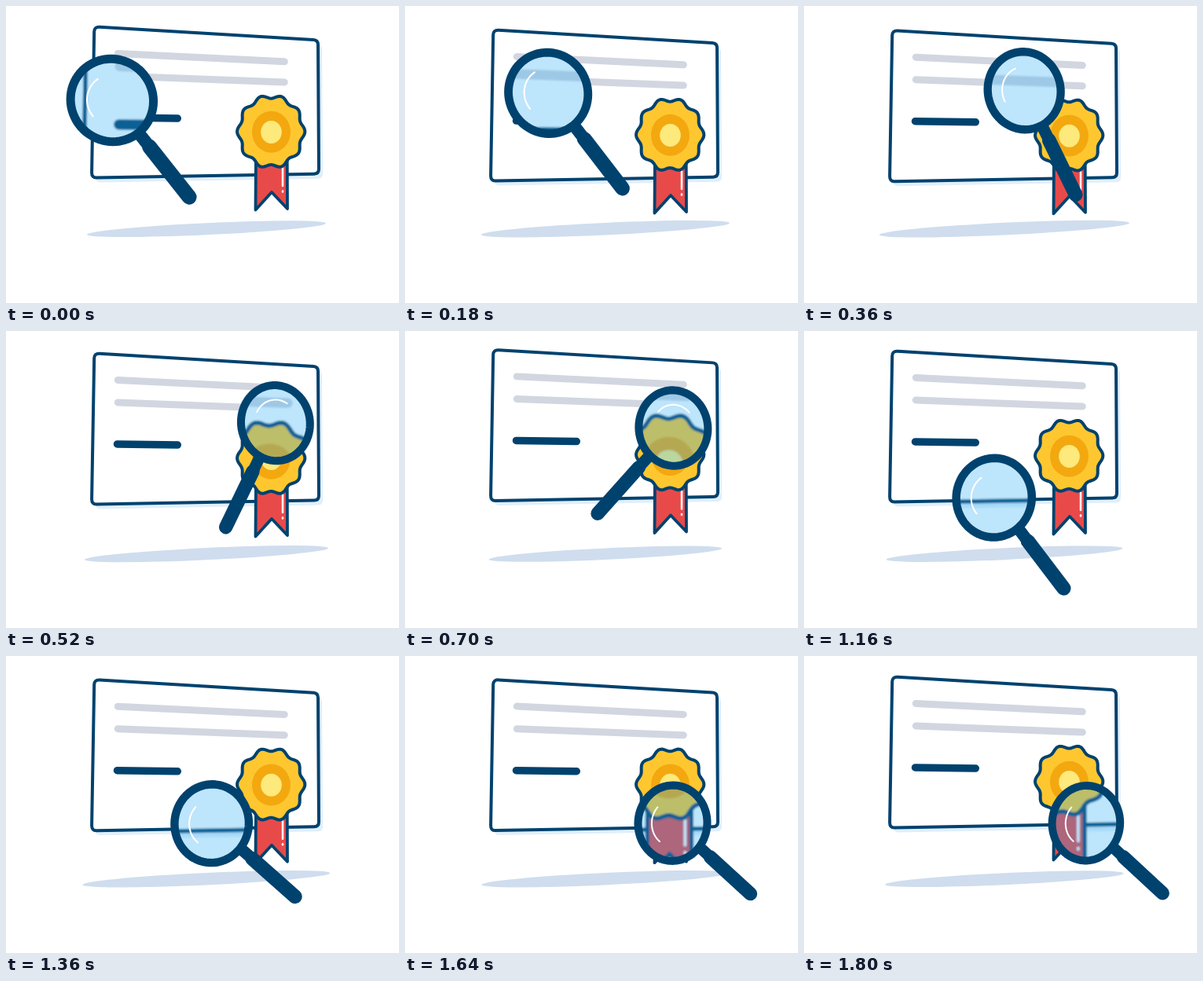
Write an HTML page that moves like this. It is 500 px wide and 378 px high and loops after 1.82 s.

```html
<!DOCTYPE html>
<html lang="en">
<head>
<meta charset="utf-8">
<title>Certificate check</title>
<style>
  html, body { margin: 0; width: 100%; height: 100%; overflow: hidden; background: #fff; }
  svg { display: block; width: 500px; height: 378px; }
  .ink { stroke: #00426e; stroke-linecap: round; stroke-linejoin: round; }
</style>
</head>
<body>
<svg viewBox="0 0 500 378">
  <defs>
    <clipPath id="glass"><path id="glassShape"/></clipPath>
    <filter id="soft" filterUnits="userSpaceOnUse" x="-20" y="-20" width="540" height="418">
      <feGaussianBlur stdDeviation="0.9"/>
    </filter>
    <path id="sheet" d="M119 26.7 L391 42.9 Q397 43.3 397 49 L398 207.5 Q398 213.5 392 213.6 L115 218.4 Q109 218.5 109.1 212 L112.2 32.5 Q112.5 26.3 119 26.7Z"/>
  </defs>

  <ellipse id="shadow" rx="152" ry="7.5" fill="#cfddee"/>

  <g id="card">
    <use href="#sheet" x="5" y="6" fill="#e0effb"/>
    <use href="#sheet" class="ink" fill="#fff" stroke-width="4"/>
    <g fill="none" stroke="#d2d6e0" stroke-width="9" stroke-linecap="round">
      <path d="M142.3 60.4 L354.3 70.8"/>
      <path d="M142.3 89 L354.3 97"/>
    </g>
    <path class="ink" stroke-width="9.5" d="M141.5 142 L218.3 143"/>
    <path class="ink" fill="#e84a4a" stroke-width="3.8" d="M318 190 L317.5 259.5 L338 237 L358 258 L357.7 190Z"/>
    <path fill="none" stroke="#fff" stroke-width="2.5" stroke-linecap="round" d="M352 206 V229 M352 235.5 V236.5"/>
    <path id="seal" class="ink" fill="#ffc72f" stroke-width="4"/>
    <ellipse cx="337.5" cy="160.3" rx="24.5" ry="26.5" fill="#f3a810"/>
    <ellipse cx="337.5" cy="160.5" rx="13.3" ry="14.5" fill="#fde97c"/>
  </g>

  <path id="neck" class="ink"/>
  <path id="handle" class="ink"/>
  <g clip-path="url(#glass)">
    <g filter="url(#soft)">
      <rect x="-20" y="-20" width="540" height="418" fill="#fff"/>
      <use id="zoomed" href="#card"/>
    </g>
    <rect width="500" height="378" fill="#26aaf2" fill-opacity="0.3"/>
  </g>
  <path id="rim" class="ink" fill="none"/>
  <path id="glint" fill="none" stroke="#fff" stroke-linecap="round"/>
</svg>

<script>
const LOOP = 1820, ZOOM = 1.4, RAD = Math.PI / 180;
const el = id => document.getElementById(id);
const set = (id, attrs) => {
  for (const name in attrs) el(id).setAttribute(name, attrs[name]);
};

const ease = (t, from, to) => {
  const p = Math.min(1, Math.max(0, (t - from) / (to - from)));
  return (1 - Math.cos(Math.PI * p)) / 2;
};
const quad = (p, a, b, c) =>
  a.map((v, i) => (1 - p) ** 2 * v + 2 * p * (1 - p) * b[i] + p * p * c[i]);

// The magnifier lives on a plane that recedes to the right.
const TILT = 0.00042;
const depth = u => 1 / (1 + TILT * u);
const project = (u, v) => [136 + u * depth(u), 181 + v * depth(u)];

const toPath = points => 'M' + points.map(p => p.map(n => n.toFixed(2)).join(' ')).join('L');
const arc = (center, radius, from, to, steps) =>
  toPath(Array.from({ length: steps + 1 }, (_, i) => polar(center, radius, from + (to - from) * i / steps)));
const polar = ([u, v], radius, degrees) =>
  project(u + radius * Math.cos(degrees * RAD), v + radius * Math.sin(degrees * RAD));

// Path legs of the lens centre, 600 ms each: start, control, end.
const LEGS = [
  [[0, -61], [115, -92], [238, -68]],
  [[238, -68], [147, -32], [111, 34]],
  [[111, 34], [179, 34], [247, 35]]
];

function lensCenter(t) {
  const leg = Math.min(2, Math.floor(t / 600));
  return quad(ease(t, leg * 600, leg * 600 + 600), ...LEGS[leg]);
}

const handleAngle = t => 51.2 + 82.5 * ease(t, 280, 620) - 93.3 * ease(t, 960, 1220);

function drawSeal() {
  const points = Array.from({ length: 180 }, (_, i) => {
    const a = i * 2 * RAD, r = 1 + 0.052 * Math.cos(10 * a);
    return [337.2 + 41 * r * Math.cos(a), 159.8 + 44.5 * r * Math.sin(a)];
  });
  set('seal', { d: toPath(points) + 'Z' });
}

function draw(t) {
  const bob = Math.sin(2 * Math.PI * Math.min(t, 1800) / 1200);
  set('card', { transform: `translate(0 ${5 * bob})` });
  set('shadow', { transform: `translate(255 283.7) scale(${1 + 0.049 * bob}) skewY(-2.7)` });

  const center = lensCenter(t), angle = handleAngle(t);
  const [x, y] = project(...center), w = depth(center[0]);
  const spoke = (from, to) => toPath([polar(center, from, angle), polar(center, to, angle)]);

  set('zoomed', { transform: `translate(${x * (1 - ZOOM)} ${y * (1 - ZOOM)}) scale(${ZOOM})` });
  set('glassShape', { d: arc(center, 52, 0, 360, 72) + 'Z' });
  set('rim', { d: arc(center, 52.7, 0, 360, 72) + 'Z', 'stroke-width': 11 * w });
  set('neck', { d: spoke(54, 80), 'stroke-width': 16 * w });
  set('handle', { d: spoke(76, 161.5), 'stroke-width': 19 * w });
  set('glint', { d: arc(center, 32.5, angle + 89, angle + 183, 24), 'stroke-width': 2.2 * w });
}

drawSeal();
const start = performance.now();
function tick() {
  draw((performance.now() - start) % LOOP);
  requestAnimationFrame(tick);
}
tick();
</script>
</body>
</html>
```
